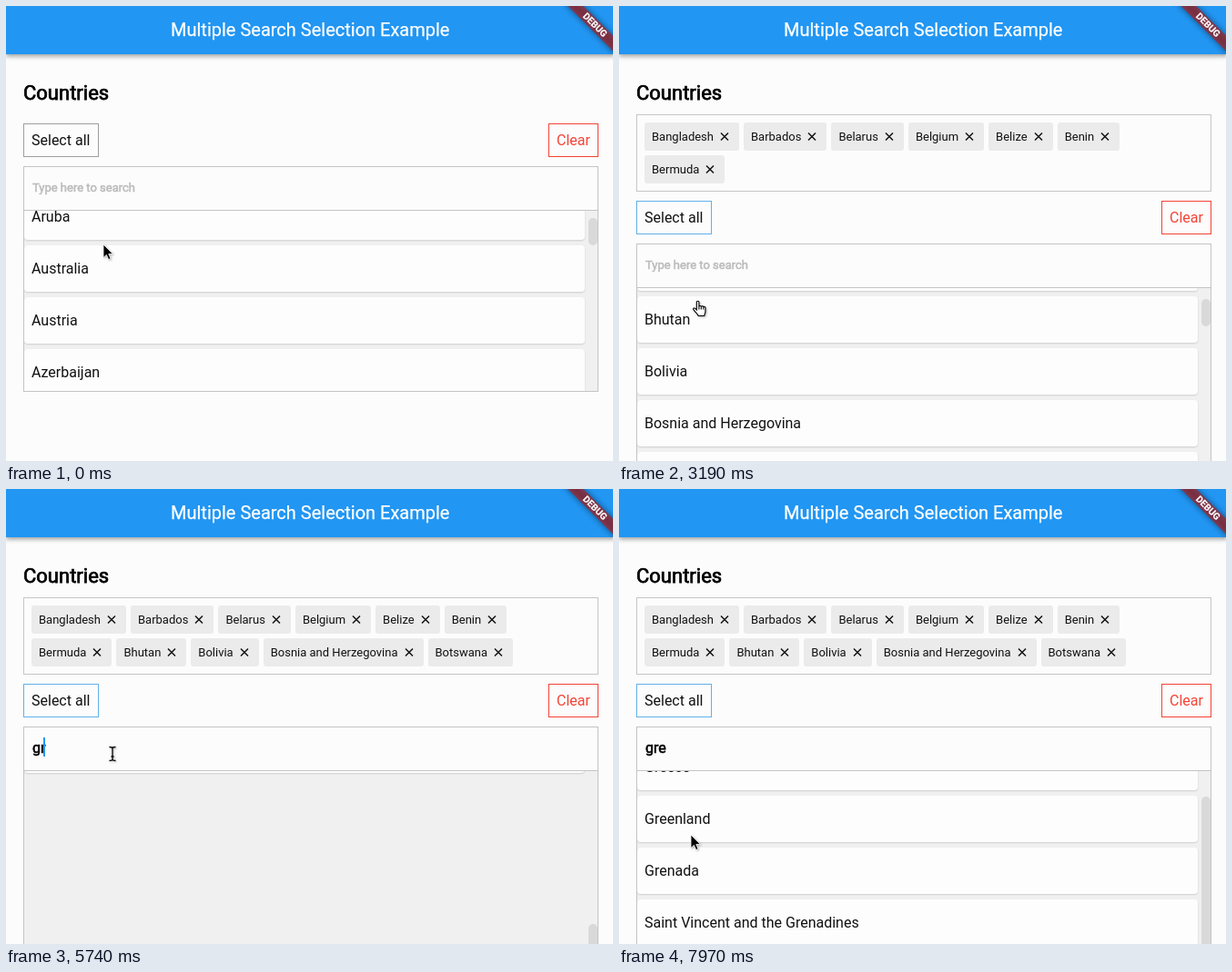
Animation of 667x500 px, one loop 8 s. Source, as an HTML page:

```html
<!DOCTYPE html>
<html lang="en">
<head>
<meta charset="utf-8">
<title>Multiple Search Selection Example</title>
<style>
  html, body { margin: 0; width: 100%; height: 100%; overflow: hidden; background: #fcfcfc; }
  body { position: relative; font: 16px Roboto, sans-serif; color: #111; cursor: none; }
  body * { position: absolute; box-sizing: border-box; white-space: nowrap; }
  .bar { inset: 0 0 auto; height: 53px; background: #2196f3;
    box-shadow: 0 2px 4px rgba(0,0,0,.2), 0 3px 5px rgba(0,0,0,.12), 0 1px 8px rgba(0,0,0,.1); }
  .bar span { left: 181px; font-size: 20px; line-height: 52px; color: #fff; -webkit-text-stroke: .25px; }
  .banner { left: 631px; top: 25px; width: 80px; height: 12px; transform-origin: 40px -28px; transform: rotate(45deg); }
  .banner i { inset: 0; background: rgba(0,0,0,.5); filter: blur(3.5px); }
  .banner b { inset: 0; background: rgba(183,28,28,.63); color: #fff; text-align: center;
    font: 700 10.2px/12px Roboto, sans-serif; -webkit-text-stroke: .2px; }
  h1 { margin: 0; left: 19px; top: 83px; font: 22px/26px Roboto, sans-serif; color: #000; -webkit-text-stroke: .75px; }
  #chips { left: 19px; top: 119px; width: 632px; padding: 8px; border: 1px solid #c6c6c6;
    display: flex; flex-wrap: wrap; align-content: flex-start; gap: 5px; }
  #chips span { position: relative; height: 31px; padding: 0 28px 0 8px; border-radius: 3px;
    background: #ebebeb; font-size: 13px; line-height: 31px; }
  #chips svg { right: 8px; top: 7px; }
  #panel { left: 0; width: 667px; height: 320px; }
  .button { top: 0; height: 37px; padding: 0 8px; border: 1px solid #9e9e9e; line-height: 35px; }
  #all { left: 19px; width: 83px; }
  #clear { left: 596px; width: 55px; border-color: #f44336; color: #f44336; }
  .box { left: 19px; top: 47px; width: 632px; height: 248px; border: 1px solid #c4c4c4; }
  .field { left: 0; top: 0; width: 630px; height: 48px; border-bottom: 1px solid #c4c4c4; }
  #hint, #query { left: 9px; line-height: 46px; }
  #hint { font-size: 13px; color: #bababa; -webkit-text-stroke: .5px; }
  #query { color: #000; -webkit-text-stroke: .6px; }
  #caret { top: 11px; width: 2px; height: 21px; background: #2196f3; }
  .list { left: 0; top: 48px; width: 630px; height: 198px; background: #f0f0f0; overflow: hidden; }
  #rows { inset: 0; }
  #rows div { left: 0; width: 616px; height: 51px; padding-left: 8px; border-radius: 4px; line-height: 51px;
    background: #fdfdfd; box-shadow: 0 1px 2px rgba(0,0,0,.14); }
  #thumb { left: 620px; width: 10px; border-radius: 5px; background: #d9d9d9; }
  #pointer { left: 0; top: 0; width: 24px; height: 28px; overflow: visible;
    filter: drop-shadow(1px 1px 1px rgba(0,0,0,.3)); }
</style>
</head>
<body>
<h1>Countries</h1>
<div id="chips"></div>
<div id="panel">
  <div class="button" id="all">Select all</div>
  <div class="button" id="clear">Clear</div>
  <div class="box">
    <div class="field"><span id="hint">Type here to search</span><span id="query"></span><i id="caret"></i></div>
    <div class="list"><div id="rows"></div><i id="thumb"></i></div>
  </div>
</div>
<div class="bar"><span>Multiple Search Selection Example</span></div>
<div class="banner"><i></i><b>DEBUG</b></div>
<svg id="pointer">
  <path id="arrow" d="M0 0V14.5L3.4 11.4 5.7 16.6 8 15.6 5.8 10.5H10.4Z" stroke="#fff" stroke-width=".8"/>
  <path id="hand" d="M-.7 10V1.5a1.3 1.3 0 0 1 2.6 0V6.500a1.200 1.200 0 0 1 2.400 .3a1.200 1.200 0 0 1 2.400 .5a1.100 1.100 0 0 1 2.200 .6V12c0 2-1.200 3-1.200 4.500H1.300C.8 14.500-2.700 12-4.200 9.500c-.7-1.400 1-2 1.900-1.100z M1.900 6.500v3M4.300 7v2.500M6.700 7.500v2" fill="#fff" stroke="#000" stroke-width="1.1"/>
  <path id="beam" d="M-3.500-7.500Q0-7.500 0-6Q0-7.500 3.500-7.500M0-6V6M-3.500 7.500Q0 7.500 0 6Q0 7.500 3.500 7.500M-1.500 3H1.500" fill="none" stroke="#000" stroke-width="1.3"/>
</svg>
<script>
const LOOP = 8000, PITCH = 57, VIEW = 198, FULL_COUNT = 240;
const countries = `Afghanistan,Albania,Algeria,American Samoa,Andorra,Angola,Anguilla,Antarctica,Antigua and Barbuda,
Argentina,Armenia,Aruba,Australia,Austria,Azerbaijan,Bahamas,Bahrain,Bangladesh,Barbados,Belarus,Belgium,Belize,Benin,
Bermuda,Bhutan,Bolivia,Bosnia and Herzegovina,Botswana,Bouvet Island,Brazil,British Indian Ocean Territory,
Brunei Darussalam,Bulgaria,Burkina Faso,Burundi,Cambodia,Cameroon,Congo,Egypt,French Guiana,Gabon,Gambia,Georgia,
Germany,Ghana,Gibraltar,Greece,Greenland,Grenada,Guadeloupe,Guam,Guatemala,Guernsey,Guinea,Guinea-Bissau,Guyana,
Hong Kong,Hungary,Kyrgyzstan,Luxembourg,Madagascar,Mongolia,Montenegro,Niger,Nigeria,Paraguay,Portugal,
Saint Vincent and the Grenadines,Senegal,Singapore,Togo,Tonga,Uganda,Uruguay`.replace(/\n/g, '').split(',');

const firstPick = countries.indexOf('Bangladesh');
const pickTimes = [1110, 1400, 2180, 2470, 2620, 2800, 3190, 3550, 4000, 4175, 4360];
const typing = [[5350, 'g'], [5500, 'gr'], [6515, 'gre']];
// time, x, y of the pointer's hot spot
const path = [[0, 107, 262], [120, 107, 262], [340, 115, 230], [550, 102, 260], [790, 102, 260], [930, 83, 285],
  [1500, 83, 285], [1800, 83, 315], [2100, 83, 315], [2200, 86, 312], [2320, 86, 324], [3190, 86, 324],
  [3370, 89, 352], [3700, 89, 352], [3760, 89, 350], [4700, 89, 350], [4930, 117, 291], [6400, 117, 291],
  [6510, 115, 284], [6900, 115, 284], [7220, 108, 318], [7900, 79, 380], [LOOP, 79, 380]];
const shapes = [[0, 'arrow'], [880, 'hand'], [4850, 'beam'], [7130, 'arrow']];

const $ = id => document.getElementById(id);
const clamp = (v, a = 0, b = 1) => Math.min(b, Math.max(a, v));
const easeOut = (t, from, to) => Math.sin(clamp((t - from) / (to - from)) * Math.PI / 2);
const latest = (keys, t, none) => keys.reduce((value, [at, next]) => t >= at ? next : value, none);

// Overdamped spring going from 1 to 0
function spring(ms) {
  const s = clamp(ms, 0, 660) / 1000;
  return 1.7 * Math.exp(-9.07 * s) - .7 * Math.exp(-22 * s);
}

function scrollAt(t) {
  if (t >= 6515) return 33 + 61 * spring(t - 6520);
  if (t >= 5500) return 90 + 1011 * spring(t - 5500);
  return 649 + 314 * easeOut(t, 120, 550) + 138 * easeOut(t, 4530, 4930);
}

function pointAt(t) {
  const i = Math.max(1, path.findIndex(k => k[0] > t));
  const [t0, x0, y0] = path[i - 1], [t1, x1, y1] = path[i];
  const p = (t - t0) / (t1 - t0), e = p * p * (3 - 2 * p);
  return [x0 + (x1 - x0) * e, y0 + (y1 - y0) * e];
}

let shownPicks = -1;
function drawChips(picks) {
  if (picks === shownPicks) return;
  shownPicks = picks;
  const cross = '<svg width="16" height="16"><path d="M4 4.500L12 12.500M12 4.500L4 12.500" stroke="#111" stroke-width="1.5"/></svg>';
  $('chips').innerHTML = countries.slice(firstPick, firstPick + picks)
    .map(name => `<span>${name}${cross}</span>`).join('');
  const height = picks === 0 ? 0 : picks < 7 ? 50 : 85;
  $('chips').style.display = picks ? 'flex' : 'none';
  $('chips').style.height = height + 'px';
  $('panel').style.top = 129 + height + 'px';
  $('all').style.borderColor = picks < 7 ? '#9e9e9e' : '#62b0e8';
}

function drawList(t, picks, query) {
  const names = countries.filter((name, i) =>
    (i < firstPick || i >= firstPick + picks) && name.toLowerCase().includes(query));
  const scroll = Math.round(scrollAt(t));
  $('rows').innerHTML = names.map((name, i) => {
    const top = 3 + PITCH * i - scroll;
    return top > -56 && top < VIEW ? `<div style="top:${top}px">${name}</div>` : '';
  }).join('');

  const content = PITCH * (query ? names.length : FULL_COUNT) + 3, max = content - VIEW;
  const over = Math.max(0, scroll - max);
  const length = Math.max(30, VIEW * VIEW / content * (1 - over / VIEW));
  $('thumb').style.height = length + 'px';
  $('thumb').style.top = (VIEW - length) * clamp(scroll / max) + 'px';
}

function drawField(t, query) {
  $('hint').style.display = query ? 'none' : '';
  $('query').textContent = query;
  const caretOn = (t >= 5300 && t < 6000) || (t >= 6500 && t < 7020);
  $('caret').style.display = caretOn ? '' : 'none';
  $('caret').style.left = 8 + $('query').offsetWidth - (query ? 1 : 0) + 'px';
}

function drawPointer(t) {
  const [x, y] = pointAt(t), shape = latest(shapes, t);
  $('pointer').style.transform = `translate(${Math.round(x)}px,${Math.round(y)}px)`;
  for (const id of ['arrow', 'hand', 'beam']) $(id).style.display = id === shape ? '' : 'none';
}

function draw() {
  const t = performance.now() % LOOP;
  const picks = pickTimes.filter(at => t >= at).length;
  const query = latest(typing, t, '');
  drawChips(picks);
  drawList(t, picks, query);
  drawField(t, query);
  drawPointer(t);
  requestAnimationFrame(draw);
}
draw();
</script>
</body>
</html>
```
